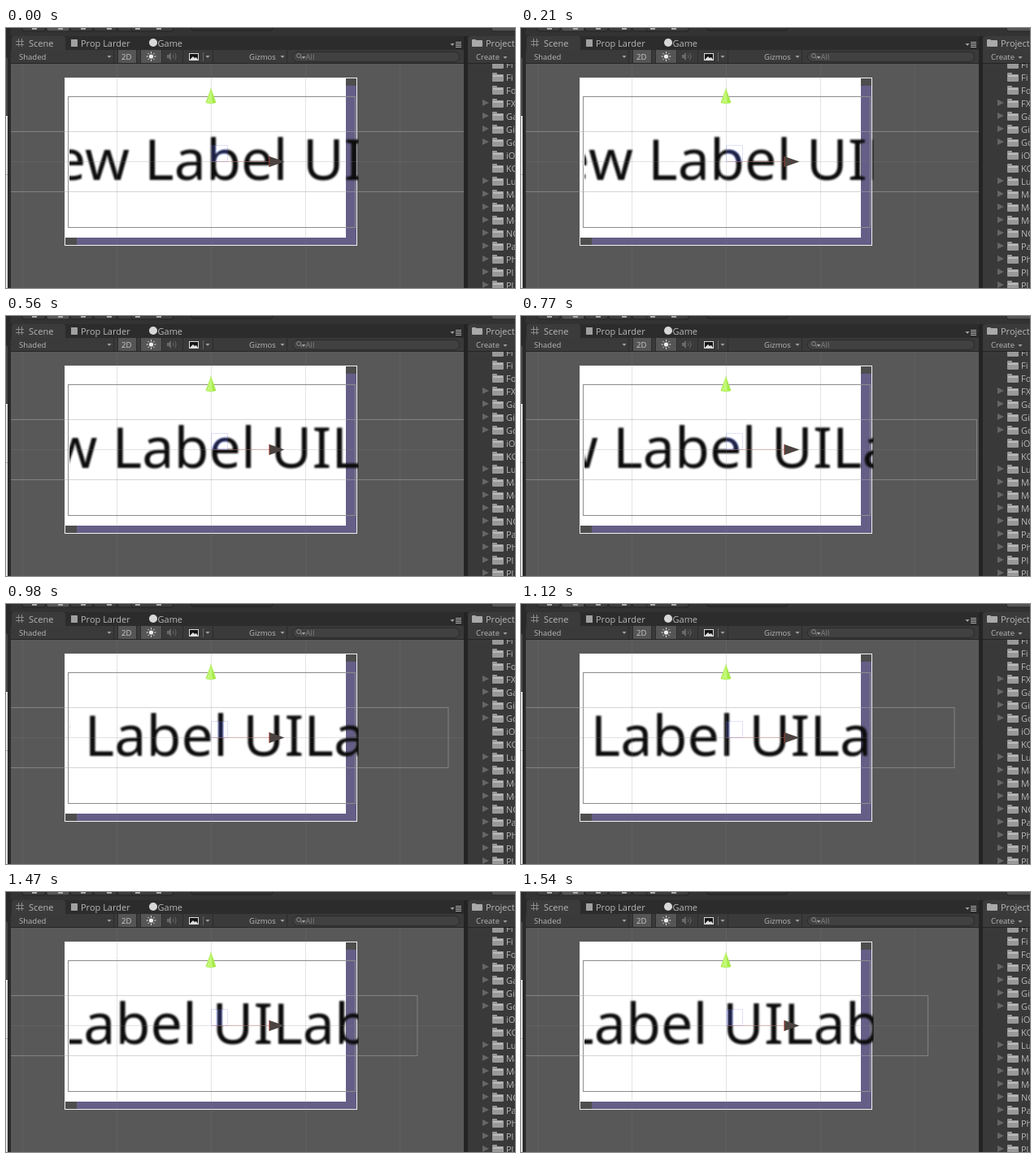
An HTML page with a canvas for the animation above (1.61 s loop, 626x320 px).

```html
<!DOCTYPE html>
<html lang="en">
<head>
<meta charset="utf-8">
<style>
html, body { margin: 0; width: 100%; height: 100%; overflow: hidden; background: #585858; }
canvas { display: block; }
</style>
</head>
<body>
<canvas id="stage" width="626" height="320"></canvas>
<script>
const ctx = document.getElementById('stage').getContext('2d');
const LOOP = 1610, STEP = 70;
// [step, x of the first "L"]
const SCROLL = [[0, 177], [3, 163], [8, 137.5], [11, 120], [16, 92.5], [22, 60]];

function rect(x, y, w, h, color) {
  ctx.fillStyle = color;
  ctx.fillRect(x, y, w, h);
}
function frame(x, y, w, h, color) {
  ctx.strokeStyle = color;
  ctx.lineWidth = 1;
  ctx.strokeRect(x + .5, y + .5, w - 1, h - 1);
}
function poly(color, ...points) {
  ctx.fillStyle = color;
  ctx.beginPath();
  for (let i = 0; i < points.length; i += 2) ctx.lineTo(points[i], points[i + 1]);
  ctx.fill();
}
function round(x, y, w, h, r, fill, stroke) {
  ctx.beginPath();
  ctx.roundRect(x, y, w, h, r);
  ctx.fillStyle = fill;
  ctx.fill();
  if (stroke) { ctx.strokeStyle = stroke; ctx.lineWidth = 1; ctx.stroke(); }
}
function text(str, x, y, size = 11, color = '#b8b8b8') {
  ctx.font = `${size}px "Open Sans", sans-serif`;
  ctx.fillStyle = color;
  ctx.fillText(str, x, y);
}
function dot(x, y, r, color) {
  ctx.fillStyle = color;
  ctx.beginPath();
  ctx.arc(x, y, r, 0, 7);
  ctx.fill();
}
const caret = (x, y = 35) => poly('#a0a0a0', x - 2.5, y - 1, x + 2.5, y - 1, x, y + 2);

function scrollAt(step) {
  const i = SCROLL.findIndex((p, k) => k && step <= p[0]);
  const [s0, x0] = SCROLL[i - 1], [s1, x1] = SCROLL[i];
  return x0 + (x1 - x0) * (step - s0) / (s1 - s0);
}

function drawTabs() {
  rect(0, 0, 626, 10, '#333');
  rect(0, 10, 626, 17, '#2c2c2c');
  for (const x of [20, 50, 79, 108, 137]) round(x, -12, 28, 16, 2, x === 50 ? '#555' : '#3d3d3d', '#222');
  round(154, -12, 52, 16, 3, '#3d3d3d', '#222');
  for (const x of [32, 64, 92, 124, 159, 185]) rect(x, 0, 6, 2, '#aaa');
  round(228, -12, 100, 15, 3, '#303030', '#222');
  round(597, -12, 40, 16, 3, '#555', '#222');

  round(7, 10, 66, 20, [4, 4, 0, 0], '#3b3b3b');
  for (const d of [0, 4]) {
    rect(15 + d, 13, 1, 10, '#8a8a8a');
    rect(12, 16 + d, 10, 1, '#8a8a8a');
  }
  text('Scene', 28, 22.5);
  rect(80, 14, 8, 9, '#a0a0a0');
  text('Prop Larder', 92, 22.5);
  dot(181, 18, 5, '#d8d8d8');
  text('Game', 186 + .5, 22.5);
  caret(549, 20);
  for (let y = 17; y < 24; y += 2) rect(553, y, 7, 1, '#aaa');
}

function drawToolbar() {
  rect(6, 27, 558, 17, '#3a3a3a');
  rect(6, 43, 558, 1, '#242424');
  rect(137, 27, 23, 16, '#555');
  rect(165, 27, 27, 16, '#555');
  for (const x of [132, 137, 160, 165, 191, 217, 254, 345]) rect(x, 27, 1, 16, '#2c2c2c');
  text('Shaded', 16, 38.5, 9.5);
  caret(127);
  text('2D', 142, 38.5, 9.5, '#ccc');
  dot(178.5, 35, 2.6, '#eee');
  ctx.strokeStyle = '#eee';
  ctx.lineWidth = 1;
  ctx.beginPath();
  for (let a = 0; a < 8; a++) {
    const c = Math.cos(a * Math.PI / 4), s = Math.sin(a * Math.PI / 4);
    ctx.moveTo(178.5 + 3.8 * c, 35 + 3.8 * s);
    ctx.lineTo(178.5 + 5.8 * c, 35 + 5.8 * s);
  }
  ctx.stroke();
  poly('#6a6a6a', 198, 33, 200, 33, 203, 30, 203, 40, 200, 37, 198, 37);
  ctx.strokeStyle = '#6a6a6a';
  for (const r of [3, 6]) {
    ctx.beginPath();
    ctx.arc(203, 35, r, -.8, .8);
    ctx.stroke();
  }
  rect(225, 31, 12, 9, '#ddd');
  rect(226, 32, 10, 7, '#151515');
  poly('#ddd', 226, 39, 230, 35, 232, 37, 234, 36, 236, 39);
  rect(242, 30, 1, 11, '#666');
  caret(248);
  text('Gizmos', 299, 38.5, 9.5);
  caret(340);
  round(352.5, 29.5, 205, 12, 6, '#414141', '#2a2a2a');
  ctx.strokeStyle = '#888';
  ctx.beginPath();
  ctx.arc(360, 34, 2.5, 0, 7);
  ctx.moveTo(362, 36);
  ctx.lineTo(364, 38.5);
  ctx.stroke();
  caret(366, 36);
  text('All', 368.5, 38.5, 9.5, '#808080');
}

function drawProject() {
  rect(563, 10, 5, 310, '#242424');
  rect(568, 27, 58, 293, '#393939');
  const names = 'Fi Fi Fo FX Ga Gi Go iO KG Lu Ma Me Mo NG Pa Ph Pl Pl'.split(' ');
  names.forEach((name, i) => {
    const y = 44 + i * 16;
    if (i > 2 && name !== 'iO' && name !== 'KG') poly('#666', 586, y - 4, 594, y, 586, y + 4);
    round(598, y - 5, 6, 4, 1, '#999');
    round(598, y - 3, 14, 9, 1, '#999');
    rect(599, y - 2, 12, 2, '#bbb');
    text(name, 615, y + 4.5);
  });
  rect(568, 27, 58, 17, '#3a3a3a');
  rect(568, 43, 58, 1, '#242424');
  text('Create', 578, 39, 9.5);
  caret(614, 36);
  round(568, 10, 70, 18, [4, 0, 0, 0], '#3b3b3b');
  round(573, 14, 5, 3, 1, '#aaa');
  round(573, 15, 13, 8, 1, '#aaa');
  text('Project', 590, 22.5);
}

function drawLeftEdge() {
  rect(0, 0, 6, 320, '#2a2a2a');
  rect(0, 37, 2, 70, '#484848');
  rect(0, 108, 2, 212, '#e0e0e0');
  rect(0, 180, 2, 1, '#aaa');
}

function drawPanel() {
  rect(73, 62, 359, 206, '#655f87');
  rect(73, 62, 345, 196, '#fff');
  rect(418, 62, 13, 9, '#4e4e4e');
  rect(73, 258, 14, 9, '#4e4e4e');
  frame(72, 61, 360, 207, '#f2f2f2');
  frame(76, 84, 354, 162, '#8c8c8c');
}

function drawLabel(x) {
  ctx.save();
  ctx.beginPath();
  ctx.rect(78, 100, 355.5, 120);
  ctx.clip();
  ctx.font = '70px "Noto Sans", sans-serif';
  ctx.fillStyle = '#0c0c0c';
  ctx.filter = 'blur(1px)';
  ctx.fillText('New Label UILabel', x - 6.9 - ctx.measureText('New ').width, 187);
  ctx.restore();
}

function drawGizmos(x) {
  for (const gx of [20, 136, 252, 368, 484]) {
    rect(gx, 44, 1, 276, 'rgba(128,128,128,.22)');
  }
  rect(6, 164, 557, 1, 'rgba(128,128,128,.22)');
  frame(-60, 127, x + 441 + 60, 75, 'rgba(172,172,172,.5)');

  rect(253, 164, 72, 1, 'rgba(205,110,95,.4)');
  ctx.globalCompositeOperation = 'lighter';
  rect(253, 145, 19, 19, 'rgba(30,40,110,.5)');
  ctx.globalCompositeOperation = 'source-over';
  frame(252, 144, 21, 21, 'rgba(120,120,230,.22)');

  poly('#a6ea4c', 252, 74, 258.5, 92, 252, 93.5, 245.5, 92);
  poly('#c3f775', 252, 74, 254, 93, 247, 92);
  poly('#4b4441', 324, 158, 342.5, 164.5, 324, 171);
  poly('rgba(165,55,45,.6)', 323, 158, 324.5, 158, 324.5, 171, 323, 171);
}

function draw(now) {
  const x = scrollAt(Math.floor(now % LOOP / STEP));
  rect(0, 0, 626, 320, '#585858');
  drawPanel();
  drawLabel(x);
  drawGizmos(x);
  drawTabs();
  drawToolbar();
  drawProject();
  drawLeftEdge();
  requestAnimationFrame(draw);
}
requestAnimationFrame(draw);
</script>
</body>
</html>
```
